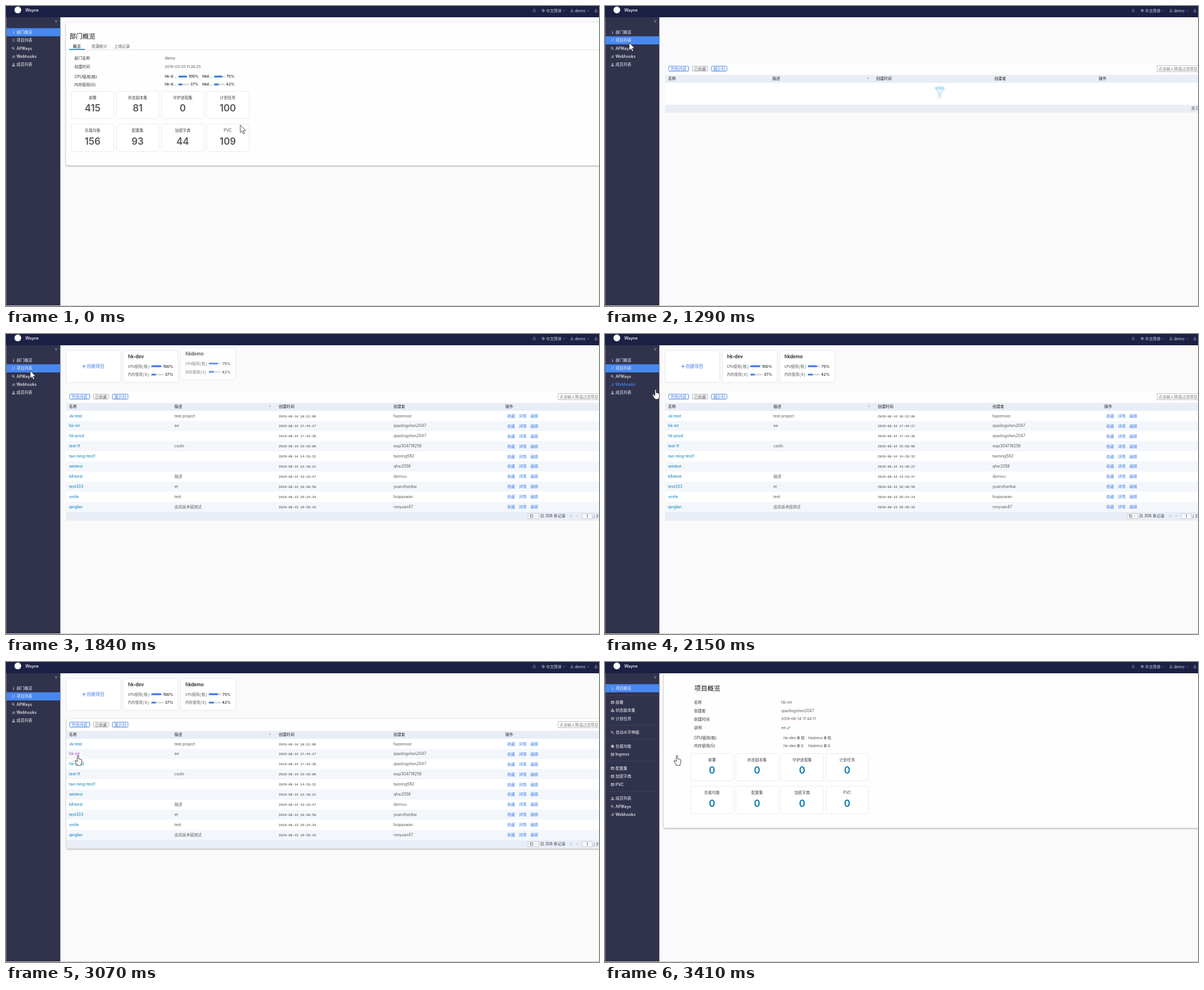
Animation, 1053 px wide and 532 px high, one loop 4640 ms. Source, as an HTML page:

```html
<!DOCTYPE html>
<html lang="zh">
<head>
<meta charset="utf-8">
<title>Wayne</title>
<style>
html, body { margin: 0; width: 100%; height: 100%; overflow: hidden; background: #fafafa; }
svg { display: block; width: 1053px; height: 532px; }
text { font-family: Inter, 'Noto Sans CJK SC', 'Noto Sans CJK', sans-serif; white-space: pre; }
.mono { font-family: 'Liberation Mono', 'Noto Sans CJK SC', 'Noto Sans CJK', monospace; }
.card { filter: drop-shadow(0 .6px 1.2px rgba(70, 90, 150, .28)); }
.panel { stroke: #ededf0; stroke-width: .7; }
.lift { filter: drop-shadow(0 1.4px .9px rgba(0, 0, 0, .36)); }
</style>
</head>
<body>
<svg id="stage" viewBox="0 0 1053 532"></svg>
<script>
const LOOP = 4640;
const TICKS = [0, 290, 370, 440, 520, 590, 770, 1240, 1310, 1390, 1460, 1610, 1690, 1770, 1840,
  1930, 2000, 2070, 2150, 2240, 2310, 2390, 2470, 2550, 2930, 3070, 3170, 3250, 3410];
const BLUE = '#3c7ce8', LINK = '#0079b8', GREY = '#565656', INK = '#222', SIDE = '#31334d', ACTIVE = '#4888ef';

// y is the vertical middle of the line
function text(x, y, str, o = {}) {
  const { size = 6.9, fill = GREY, weight = 400, anchor = 'start', cls = '', id = '' } = o;
  return `<text x="${x}" y="${(y + size * .365).toFixed(2)}" font-size="${size}" fill="${fill}" font-weight="${weight}"` +
    ` text-anchor="${anchor}" class="${cls}"${id && ` id="${id}"`}>${str}</text>`;
}
const rect = (x, y, w, h, fill, extra = '') =>
  `<rect x="${x}" y="${y}" width="${w}" height="${h}" fill="${fill}" ${extra}/>`;
const group = (id, body) => `<g id="${id}">${body}</g>`;
const line = (x1, x2, y, color, width = 1) =>
  `<path d="M${x1} ${y}H${x2}" stroke="${color}" stroke-width="${width}"/>`;

const ICONS = {
  info: 'M0-2.4v.7M-.6-.6H.1V2.2M-.8 2.2H.9',
  grid: 'M-2.4-2h.9m1 0h.9m1 0h.9M-2.4 0h.9m1 0h.9m1 0h.9M-2.4 2h.9m1 0h.9m1 0h.9',
  key: 'M-2.6-.7a1.5 1.5 0 1 0 3 0a1.5 1.5 0 1 0-3 0M0 .4L2.6 2.5',
  pin: 'M-2.5 2.5L-.5.6M-1.6-.5L1.4 2.2M-.9 0L.8-2.2L2.6-.5L.7 1.5',
  user: 'M-1.1-1.2a1.1 1.2 0 1 0 2.2 0a1.1 1.2 0 1 0-2.2 0M-2.4 2.4V1.6Q0 .2 2.4 1.6V2.4Z',
  box: 'M-2.5-2h5v4.2h-5zM-2.5-.7h5M-.8 1h1.6',
  tree: 'M-1-2.3h2v1.7h-2zM-2.6.6h2v1.7h-2zM.6.6h2v1.7h-2z',
  clock: 'M-2.3 0a2.3 2.3 0 1 0 4.6 0a2.3 2.3 0 1 0-4.6 0M0-1.4V.2H1.2',
  globe: 'M-2.3 0a2.3 2.3 0 1 0 4.6 0a2.3 2.3 0 1 0-4.6 0M-2.3 0H2.3M0-2.3Q-2 0 0 2.3Q2 0 0-2.3',
  bell: 'M-2.3 1.6Q-1.6 1-1.6-.6Q-1.4-2.4 0-2.4Q1.4-2.4 1.6-.6Q1.6 1 2.3 1.6ZM-.5 2.7h1',
  caret: 'M-1.5-.6L0 .8L1.5-.6',
  pen: 'M-2.4 2.4l.5-1.9L1.2-2.4L2.5-1.1L-.6 2Z'
};
const icon = (name, x, y, color, width = .7) =>
  `<path d="${ICONS[name]}" transform="translate(${x} ${y})" fill="none" stroke="${color}" stroke-width="${width}"/>`;

const menuItem = ([y, name, label], id, color = '#f2f3f7') =>
  `<g id="${id}" style="color:${color}">` + icon(name, 13.4, y + .3, 'currentColor') +
  text(18.7, y, label, { fill: 'currentColor', weight: 500, size: 7 }) + '</g>';

const bar = (x, y, w, pct) =>
  rect(x, y - 1.6, w, 3.2, '#d8dadd', 'rx="1.6"') + rect(x, y - 1.6, w * pct / 100, 3.2, BLUE, 'rx="1.6"');

function statCards(x0, y0, values, color) {
  const names = ['部署', '状态副本集', '守护进程集', '计划任务', '负载均衡', '配置集', '加密字典', 'PVC'];
  return names.map((name, i) => {
    const x = x0 + i % 4 * 80, y = y0 + (i > 3 ? 58.2 : 0);
    return rect(x, y, 74, 47, '#fff', 'rx="2" class="card"') +
      text(x + 37, y + 10.3, name, { anchor: 'middle', fill: '#444' }) +
      text(x + 37, y + 29.3, values[i], { anchor: 'middle', size: 16.8, weight: 600, fill: color });
  }).join('');
}

function header() {
  const pale = '#d3d5e2', dim = '#9b9eb5';
  return rect(0, 0, 1053, 20, '#1c2044') + '<circle cx="21" cy="7" r="6" fill="#fff"/>' +
    text(34.2, 7.7, 'Wayne', { fill: '#fff', weight: 500, size: 7.3 }) +
    icon('bell', 938, 8, dim) + icon('globe', 954, 8, dim) + text(959, 8, '中文简体', { fill: pale }) +
    icon('caret', 991, 8.2, dim) + icon('user', 1005, 8, dim) +
    text(1010, 8, 'demo', { fill: pale, size: 7.1 }) + icon('caret', 1034, 8.2, dim) + icon('user', 1047.5, 8, dim);
}

function sidebar() {
  const main = [[46, 'info', '部门概览'], [60.4, 'grid', '项目列表'], [75, 'key', 'APIKeys'],
    [89.4, 'pin', 'Webhooks'], [103.8, 'user', '成员列表']];
  const project = [[46, 'info', '项目概览'], [71.2, 'box', '部署'], [85.6, 'tree', '状态副本集'], [100, 'clock', '计划任务'],
    [124.6, 'key', '自动水平伸缩'], [149.2, 'globe', '负载均衡'], [163.6, 'box', 'Ingress'], [188, 'box', '配置集'],
    [202.4, 'box', '加密字典'], [217, 'box', 'PVC'], [241.6, 'user', '成员列表'], [256, 'key', 'APIKeys'], [270.2, 'pin', 'Webhooks']];
  return rect(0, 20, 96.5, 512, SIDE) + rect(0, 20, 1, 512, '#6d6f85') +
    text(89, 26.8, '«', { fill: '#9799ad', anchor: 'middle', size: 8.5 }) +
    rect(1, 39.3, 95.5, 14.4, ACTIVE, 'id="active"') +
    group('mainMenu', main.map((m, i) => menuItem(m, 'item' + i)).join('')) +
    group('projectMenu', [59.5, 112.3, 137, 176, 230].map(y => line(1, 96.5, y, '#43465f', .8)).join('') +
      project.map((m, i) => menuItem(m, 'sub' + i)).join(''));
}

function usage(y, label, a, b, w) {
  const o = { fill: INK, weight: 500, size: 6.7 };
  return text(121.5, y, label, { fill: '#333' }) + text(282, y, 'hk-d...', o) + bar(306, y + .2, w, a) +
    text(342, y, a + '%', { ...o, anchor: 'end' }) + text(348.5, y, 'hkd...', o) +
    bar(369.5, y + .2, 19.5, b) + text(406, y, b + '%', { ...o, anchor: 'end' });
}

function overview() {
  return rect(106.4, 29.3, 960, 253.4, '#fefefe', 'rx="2" class="panel" id="deptPanel"') +
    text(112.8, 54, '部门概览', { size: 11.5, fill: '#111' }) +
    text(119, 71.2, '概览', { fill: '#111', weight: 500 }) + text(151.8, 71.2, '资源统计') + text(192.3, 71.2, '上线记录') +
    line(112, 1053, 77.7, '#dcdcdc', .9) + line(112, 140, 77, LINK, 1.5) +
    text(121.5, 92, '部门名称', { fill: '#333' }) + text(282, 92, 'demo', { size: 7 }) +
    text(121.5, 107.5, '创建时间', { fill: '#333' }) + text(282, 107.5, '2019-03-25 11:26:25', { size: 6.6 }) +
    usage(125, 'CPU使用(核)', 100, 75, 15.5) + usage(139, '内存使用(G)', 37, 42, 19.5) +
    statCards(116.8, 152, [415, 81, 0, 100, 156, 93, 44, 109], GREY);
}

function spaceCard(id, x, name, cpu, mem) {
  const row = (y, label, pct, w) => text(x + 7.5, y, label, { size: 6.5, cls: 'mono' }) + bar(x + 49, y, w, pct) +
    text(x + 88, y, pct + '%', { fill: INK, size: 6.8, weight: 500, anchor: 'end' });
  return group(id, rect(x, 30, 96, 55.3, '#fff', 'rx="2" class="card"') +
    text(x + 7.8, 40.2, name, { size: 8.3, weight: 600, fill: INK }) +
    row(57.2, 'CPU使用(核)', cpu, cpu > 99 ? 18 : 22) + row(72, '内存使用(G)', mem, 22));
}

function button(x, w, label, color) {
  return rect(x, 106.7, w, 8.8, '#fff', `rx="1" stroke="${color}" stroke-width=".9"`) +
    text(x + w / 2, 111.1, label, { fill: color === BLUE ? BLUE : GREY, anchor: 'middle' });
}

function heads(xs) {
  return ['名称', '描述', '创建时间', '创建者', '操作'].map((s, i) =>
    text(xs[i], 128.3, s, { fill: '#222', weight: 500 })).join('') +
    `<path d="M${xs[1] + 168} 127.6h3.4l-1.7 2.4z" fill="#9aa0ab"/>`;
}

function tableRows() {
  const data = [
    ['vk-test', 'test project', '14 18:12:00', 'hazemoor'],
    ['hk-int', 'ee', '14 17:44:17', 'qiaolingshen2047'],
    ['hk-prod', '', '14 17:43:30', 'qiaolingshen2047'],
    ['test-lf', 'ceshi', '14 15:58:06', 'wqz304718256'],
    ['tao-ning-test1', '', '14 14:28:32', 'taoning582'],
    ['weitest', '', '14 13:48:21', 'qhw2056'],
    ['k8stest', '描述', '14 13:10:47', 'dornvu'],
    ['test333', 'et', '14 10:48:50', 'yuanshanbai'],
    ['smile', 'test', '13 20:24:34', 'linqiaowan'],
    ['qinglan', '远岚技术组测试', '13 19:36:16', 'ronyuan47']];
  return data.map(([name, note, time, owner], i) => {
    const y = 145 + 17.93 * i;
    return rect(107, y - 8.6, 946, 17.93, i % 2 ? '#f3f7fc' : '#fff', `id="row${i}"`) +
      text(112, y, name, { fill: LINK, size: 7, id: 'name' + i }) + text(299, y, note) +
      text(484.3, y + .4, '2019-08-' + time, { size: 5.8, fill: '#333', cls: 'mono' }) + text(688, y, owner) +
      ['收藏', '详情', '编辑'].map((s, k) => text(890 + 20.5 * k, y + .3, s, { fill: BLUE })).join('');
  }).join('');
}

function pager() {
  const o = { fill: '#444', size: 7 };
  const field = (x, w) => rect(x, 318.3, w, 9.4, '#f8f9fc', 'stroke="#b8bcc6" stroke-width=".7"');
  return field(927, 19) + text(929.5, 323, '10', o) + icon('caret', 941, 323, '#999', .5) +
    text(948.5, 322.8, '共 306 条记录', o) + text(1001.5, 322.5, '«', { ...o, fill: '#aaa' }) +
    text(1013, 322.5, '‹', { ...o, fill: '#aaa' }) + field(1023, 18) +
    text(1032, 323, '1', { ...o, anchor: 'middle' }) + text(1043, 323, '/ 31', o);
}

function projects() {
  const funnel = '<g fill="none" stroke="#8fcbe6" stroke-width=".9"><ellipse cx="594.5" cy="162.7" rx="5" ry="1.3" stroke="#dbe6ec"/>' +
    '<path d="M586.3 145.6L592.6 154V160.5L596.3 158.5V154L602.8 145.6" fill="#eaf6fb"/>' +
    '<ellipse cx="594.5" cy="145.4" rx="8.2" ry="1.9" fill="#cdeaf6"/></g>';
  return group('create', rect(107.3, 30, 96, 55.3, '#fff', 'rx="2" class="card"') +
      '<path d="M135.2 57.4h6.4M138.4 54.2v6.4" stroke="#3c7ce8" stroke-width=".9"/>' +
      text(143.2, 57.4, '创建项目', { size: 7.9, fill: BLUE })) +
    spaceCard('dev', 209, 'hk-dev', 100, 37) + spaceCard('demo', 311, 'hkdemo', 75, 42) +
    rect(107.3, 100.6, 960, 88.4, '#fefefe', 'rx="2" class="panel" id="tablePanel"') +
    button(113, 35.5, '所有内容', BLUE) + button(155, 27.5, '已收藏', '#b0b0b0') + button(189, 27.5, '展示列', BLUE) +
    rect(980.5, 105.4, 90, 11.2, '#fff', 'stroke="#b4b4b4" stroke-width=".8"') +
    text(983, 111, '点击输入筛选过滤项目', { fill: '#777' }) + rect(107, 122, 946, 14.5, '#e8edf6') +
    group('empty', heads([112, 297, 481.5, 691.5, 876.5]) + rect(107, 136.5, 946, 38.8, '#fff') + funnel +
      rect(107, 175.3, 946, 13.7, '#e8edf6') + text(1041, 181.2, '共 0 条记录', { fill: '#444' })) +
    group('filled', heads([112, 299, 484.5, 688, 886.5]) + tableRows() + rect(107, 315.8, 946, 15, '#e8edf6') + pager());
}

function project() {
  const labels = [['名称', 71], ['创建者', 86], ['创建时间', 101], ['说明', 116.3], ['CPU使用(核)', 134], ['内存使用(G)', 148]];
  const quota = (y, unit) => [[317, 'hk-dev'], [361, 'hkdemo']].map(([x, s]) =>
    text(x, y, `${s} <tspan font-weight="600" fill="#222">0</tspan> ${unit}`, { size: 6.8 })).join('');
  return rect(104.3, 20, 960, 274.2, '#fefefe', 'rx="2" class="panel" id="projectPanel"') +
    text(158.8, 47, '项目概览', { size: 11.5, fill: '#111' }) +
    labels.map(([s, y]) => text(158, y, s, { fill: '#333' })).join('') +
    group('details', text(313, 71, 'hk-int') + text(313, 86, 'qiaolingshen2047') +
      text(313, 101, '2019-08-14 17:44:17', { size: 6.5 }) + text(313, 116.5, 'ee') + icon('pen', 326, 116.6, LINK) +
      quota(134.2, '核') + quota(149, 'G') + statCards(153, 163, Array(8).fill(0), '#0075b4'));
}

const pointers =
  '<path id="arrow" d="M0 0V13.6L3.2 10.7L5.3 15.6L7.5 14.6L5.4 9.9H9.6Z" fill="#fff" stroke="#222" stroke-width=".8"/>' +
  '<path id="hand" d="M-1.4 1Q-1.4-.3-.2-.3Q1 -.3 1 1V6Q1.6 5.3 2.4 5.6Q3.2 5.8 3.3 6.6Q4.3 5.9 5.1 6.9Q6.7 6.5 6.7 8.2V12Q6.6 14.2 5.3 15.5V17.3H-1.7V15.8Q-4.2 13.3-5.5 9.9Q-5.8 8.5-4.7 8.3Q-3.5 8.2-2.4 10L-1.4 11Z" fill="#fff" stroke="#222" stroke-width=".85" stroke-linejoin="round"/>';

const stage = document.getElementById('stage');
stage.innerHTML = rect(0, 0, 1053, 532, '#fafafa') + group('overview', overview()) + group('projects', projects()) +
  group('project', project()) + sidebar() + header() + line(0, 1053, 531.5, '#c9c9ce') + group('pointer', pointers);

const el = {};
stage.querySelectorAll('[id]').forEach(n => el[n.id] = n);
const show = (id, on) => { el[id].style.display = on ? '' : 'none'; };
const clamp = v => Math.max(0, Math.min(1, v));
const within = (t, a, b) => t >= a && t < b;

function pointerAt(t) {
  const path = [[215, 416, 211], [590, 43, 65], [1930, 43, 65], [2150, 90, 98.5], [2550, 128, 166]];
  let i = 0;
  while (i < path.length - 2 && t >= path[i + 1][0]) i++;
  const [a, b] = [path[i], path[i + 1]];
  const p = clamp((t - a[0]) / (b[0] - a[0])), k = p * p * (3 - 2 * p);
  return [a[1] + (b[1] - a[1]) * k, a[2] + (b[2] - a[2]) * k];
}

function dropIn(id, t, start, length) {
  const p = clamp((t - start) / length);
  el[id].setAttribute('transform', `translate(0 ${-20 * (1 - p)})`);
  el[id].setAttribute('opacity', p);
}

function render(ms) {
  const t = TICKS.filter(k => k <= ms).pop();
  const list = within(t, 1240, 3170), last = t >= 3170, loaded = t >= 1610;

  show('overview', t < 1240);
  show('projects', list);
  show('project', last);
  show('mainMenu', !last);
  show('projectMenu', last);
  show('details', t >= 3250);
  show('empty', !loaded);
  show('filled', loaded);

  el.active.setAttribute('y', list ? 53.7 : 39.3);
  const hovered = within(t, 590, 1240) ? 1 : within(t, 2070, 2150) ? 2 : within(t, 2150, 2240) ? 3 : -1;
  for (let i = 0; i < 5; i++) el['item' + i].style.color = i === hovered ? '#4a8df5' : '#f2f3f7';

  el.deptPanel.classList.toggle('lift', t < 770);
  el.tablePanel.classList.toggle('lift', t >= 3070);
  el.projectPanel.classList.toggle('lift', t >= 3410);
  el.tablePanel.setAttribute('height', loaded ? 230.2 : 88.4);
  el.name1.setAttribute('fill', t >= 2930 ? '#a64bb5' : LINK);

  dropIn('create', t, 1240, 220);
  dropIn('dev', t, 1570, 250);
  dropIn('demo', t, 1650, 250);

  const [x, y] = pointerAt(t);
  const hand = hovered >= 0 || t >= 2550;
  show('hand', hand);
  show('arrow', !hand);
  el.row0.setAttribute('fill', within(t, 2240, 2550) && within(y, 136.5, 154.3) ? '#f3f7fc' : '#fff');
  el.pointer.setAttribute('transform', `translate(${x.toFixed(1)} ${y.toFixed(1)})`);
}

const start = performance.now();
function frame() {
  render((performance.now() - start) % LOOP);
  requestAnimationFrame(frame);
}
frame();
</script>
</body>
</html>
```
